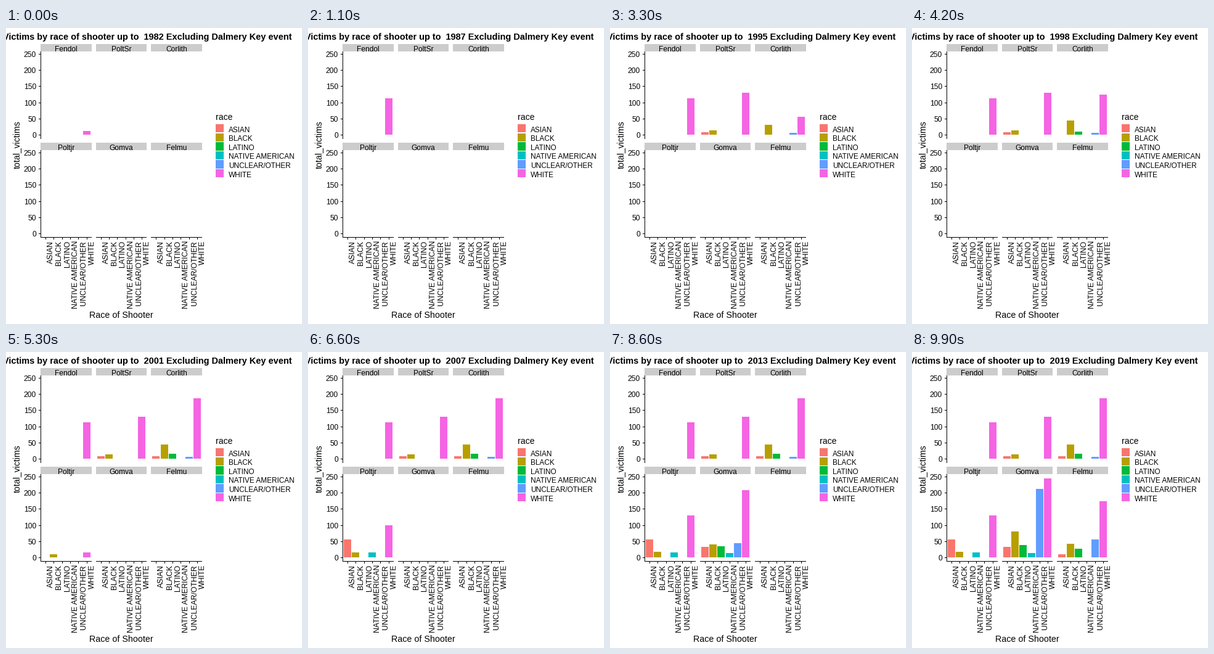
Recreate the animation shown at these times as a matplotlib script. Size 480x480 px, loop 10 s.

```python
import matplotlib.pyplot as plt
import numpy as np
from matplotlib.animation import FuncAnimation
from matplotlib.patches import Rectangle

SIZE, DPI = 480, 96
PX = 72 / DPI  # points per pixel
plt.rcParams["font.family"] = "Liberation Sans"

RACES = ["ASIAN", "BLACK", "LATINO", "NATIVE AMERICAN", "UNCLEAR/OTHER", "WHITE"]
COLORS = ["#F8766D", "#B79F00", "#00BA38", "#00BFC4", "#619CFF", "#F564E3"]

# Panel: name, last year, and per race initial the first year followed by
# running totals spread evenly from that year to the last one
PANELS = [
    ("Fendol", 1988, dict(W=(1982, 11, 112))),
    ("PoltSr", 1992, dict(A=(1991, 7), B=(1990, 14), W=(1989, 64, 129))),
    ("Corlith", 2000, dict(A=(1999, 7), B=(1993, 30, 30, 44, 44), L=(1997, 7, 15),
                           U=(1995, 6), W=(1993, 27, 75, 187))),
    ("Poltjr", 2008, dict(A=(2007, 55), B=(2001, 9, 9, 17), N=(2005, 15),
                          W=(2003, 15, 50, 130))),
    ("Gomva", 2016, dict(A=(2009, 18, 33, 33), B=(2009, 5, 16, 28, 42, 80),
                         L=(2011, 12, 33, 38), N=(2014, 13),
                         U=(2009, 43, 43, 43, 43, 211),
                         W=(2009, 11, 35, 183, 212, 243))),
    ("Felmu", 2019, dict(A=(2017, 5, 9, 9), B=(2017, 9, 15, 42), L=(2017, 11, 26),
                         U=(2018, 41, 56), W=(2017, 75, 167, 172))),
]

YEARS = [1982, 1984] + [y for y in range(1986, 2020) if y != 2002]

# Each step is (year in title, year of bars); the bars change one step early
TIMELINE = []
for k, year in enumerate(YEARS):
    TIMELINE += [(year, year)] * (2 if k < 31 else 1)
    if k + 1 < len(YEARS):
        TIMELINE.append((year, YEARS[k + 1]))

COLS = [56 + 89.6 * c for c in range(3)]  # left edges of the panels
ROWS = [26, 186]                          # top edges of the strips
WIDTH, STRIP_H, BASE = 82.6, 12, 147
UNIT = 0.5267  # pixels per victim

fig = plt.figure(figsize=(SIZE / DPI, SIZE / DPI), dpi=DPI, facecolor="white")
ax = fig.add_axes([0, 0, 1, 1])
ax.set(xlim=(0, SIZE), ylim=(SIZE, 0))
ax.axis("off")


def box(x0, y0, x1, y1, color="black"):
    """Fill a rectangle whose edges are rounded to whole pixels."""
    x0, y0, x1, y1 = map(round, (x0, y0, x1, y1))
    return ax.add_patch(Rectangle((x0, y0), x1 - x0, y1 - y0,
                                  facecolor=color, lw=0, aa=False))


def label(x, y, s, size=12, **kw):
    return ax.text(x, y, s, fontsize=size * PX, va="baseline",
                   rotation_mode="anchor", **kw)


def center(left, j):
    return left + 8.05 + 13.35 * j


def total(year, last, first, *totals):
    if year < first:
        return 0
    return np.interp(year, np.linspace(first, last, len(totals)), totals)


bars = []
for i, (name, last, data) in enumerate(PANELS):
    left, top = COLS[i % 3], ROWS[i // 3]
    strip = box(left, top, left + WIDTH, top + STRIP_H, "#CCCCCC")
    label(left + WIDTH / 2, top + 12, name, ha="center").set_clip_path(strip)
    for j, race in enumerate(RACES):
        if race[0] in data:
            x = round(center(left, j) - 6)
            bar = box(x, top + BASE, x + 12, top + BASE, COLORS[j])
            bars.append((bar, x, top + BASE, last, data[race[0]]))

for top in ROWS:
    box(56, top + STRIP_H, 57, top + 154)
    for v in range(0, 251, 50):
        y = round(top + BASE + 0.4 - v * UNIT)
        box(53, y, 56, y + 1)
        label(49, y + 5, str(v), ha="right")

for left in COLS:
    box(left, 339, left + WIDTH, 340)
    for j, race in enumerate(RACES):
        x = round(center(left, j))
        box(x, 340, x + 1, 343)
        label(x + 12, 345, race, 12.2, rotation=90, ha="right")

label(187, 470, "Race of Shooter", 14.2, ha="center")
label(22, 189, "total_victims", 14, rotation=90, ha="center")

label(339.6, 149, "race", 14)
for j, (race, color) in enumerate(zip(RACES, COLORS)):
    y = 156 + 14.6 * j
    box(340, y, 353, y + 13.4, color)
    label(361, round(y + 12.6), race, 11.8)

title = label(-5, 19, "", 14.5, weight="bold")


def update(n):
    shown, year = TIMELINE[n]
    title.set_text(f"Victims by race of shooter up to  {shown} Excluding Dalmery Key event")
    for bar, x, base, last, growth in bars:
        h = round(total(year, last, *growth) * UNIT)
        bar.set_bounds(x, base - h, 12, h)
        bar.set_visible(h > 0)
    return [title] + [b[0] for b in bars]


anim = FuncAnimation(fig, update, frames=len(TIMELINE), interval=100,
                     repeat=True, repeat_delay=0, blit=False)
plt.show()
```
